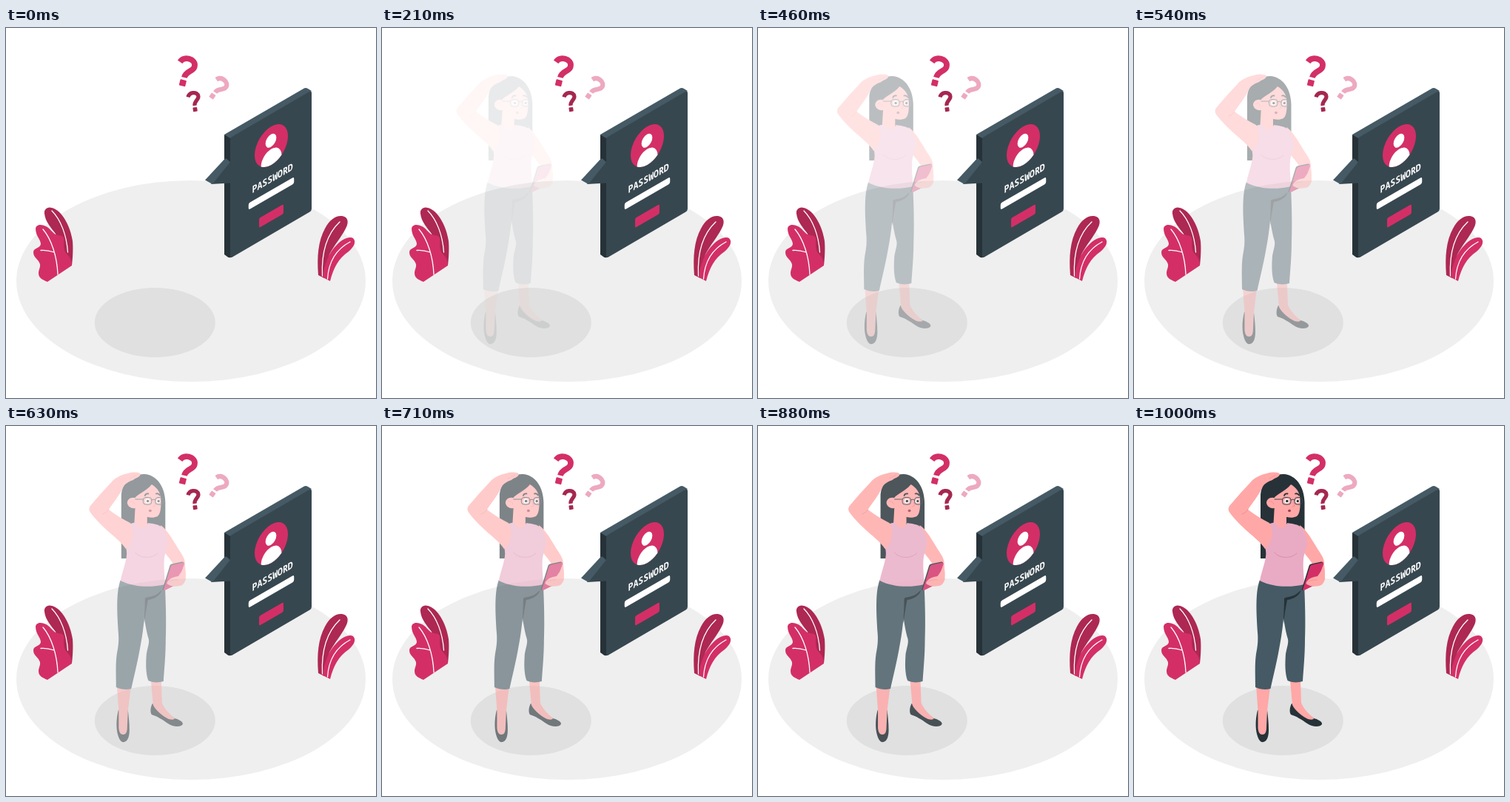
Animation of 500 by 500 pixels, one loop 1040 ms. Source, as an HTML page:

```html
<!DOCTYPE html>
<html lang="en">
<head>
<meta charset="utf-8">
<title>Forgotten password</title>
<style>
  html, body { margin: 0; width: 100%; height: 100%; overflow: hidden; background: #fff; }
  svg { display: block; width: 100vw; height: 100vh; }
  .pink { fill: #d32f66; }
  .deep { fill: #ad2853; }
  .dark { fill: #263238; }
  .skin { fill: #ffa8a7; }
  .slate { fill: #455a64; }
  .front { fill: #37474f; }
  .vein { fill: none; stroke: #fff; stroke-width: 1.3; stroke-linecap: round; }
  .line { fill: none; stroke-linecap: round; stroke-linejoin: round; }
</style>
</head>
<body>
<svg viewBox="0 0 500 500">
  <defs>
    <g id="ask">
      <path d="M-10.500-10.500C-8.500-15.500-4.500-17.500 0-17.500C6-17.500 10.200-14 10.200-9C10.200-2 .3-1 .3 8.500" fill="none" stroke="currentColor" stroke-width="7.800"/>
      <rect x="-4.200" y="12" width="8.600" height="8.400" rx="1" fill="currentColor"/>
    </g>
  </defs>

  <ellipse cx="250" cy="342" rx="236" ry="136" fill="#efefef"/>
  <ellipse cx="201.3" cy="398" rx="81.5" ry="47" fill="#e0e0e0"/>

  <g id="questions">
    <use href="#ask" color="#d32f66" transform="translate(242.700 58.500) rotate(14)"/>
    <use href="#ask" color="#a5274f" transform="translate(254 99.300) rotate(-8) scale(.67)"/>
    <use href="#ask" color="#eda9c0" transform="translate(286.300 81.300) rotate(35) scale(.8)"/>
  </g>

  <g id="board">
    <path class="dark" d="M295 144L304 147V310Q301 311 299 309L295 306Z"/>
    <path class="slate" d="M295 144L402 82Q405 80 408 82L413 85L303 149Z"/>
    <path class="front" d="M303 151Q303 148 306 146.500L409 86.500Q413 84 413 88V244Q413 247 410.500 248.500L306 309.500Q303 311 303 308Z"/>
    <path class="front" d="M277 211L301 180L303 182V209.500Z"/>
    <path class="slate" d="M269 205.500L294.500 178Q297 175.500 299 177.500L303 181L279 211Z"/>
    <g transform="matrix(.866 -.5 0 1 358.500 159)">
      <circle class="pink" r="26"/>
      <circle cx="-.6" cy="-7" r="8.500" fill="#fff"/>
      <path d="M-16 20.500A16 16 0 0 1 16 20.500A26 26 0 0 1-16 20.500Z" fill="#fff"/>
      <text x="-30" y="49.500" font-family="'Noto Sans Mono', 'DejaVu Sans Mono', monospace" font-size="13.300" font-weight="600" fill="#fff">PASSWORD</text>
      <rect x="-35.500" y="60" width="71" height="9" rx="2.500" fill="#fff"/>
      <rect class="pink" x="-19" y="88.500" width="38" height="13" rx="2"/>
    </g>
  </g>

  <g id="plants">
    <path class="deep" d="M52 251C51 245 56 241 62 243C75 246 87 267 90 288C91 300 90 312 89 321L77 312L67 278C62 271 53 262 52 251Z"/>
    <path class="vein" d="M62 247C74 259 82 280 83.500 303"/>
    <path class="pink" d="M40 271C41 265 48 265 54 268C59 270 62 276 67 279C71 281 76 279 78 284C79 289 77 294 79 300C80 306 88 306 89 321L56 343C49 340 44 338 44 331C44 326 48 322 45 317C43 312 37 310 37 303C37 297 46 298 47 292C47 286 40 281 40 271Z"/>
    <path class="vein" d="M50 272C61 285 69 308 70 333M47 300.500C53 300 59 301 65 303"/>
    <path class="deep" d="M422 334C420 308 422 288 431 271C437 259 446 253 454 254C462 255 464 262 459 271C453 283 443 294 437 306L430 338Z"/>
    <path class="vein" d="M451 262C435 277 426 302 427.500 335"/>
    <path class="pink" d="M428 337C430 320 436 303 448 292C455 285 464 281 469 284C474 289 470 296 463 302C449 312 443 323 438 342Z"/>
    <path class="vein" d="M465 289C446 299 436 316 434.500 339"/>
  </g>

  <g id="woman" opacity="0">
    <path class="dark" d="M171 179V96C171 76 184 65 202 65C219 66 230 82 230.500 103V140H190V160L180 179Z"/>

    <g id="legs">
      <path class="dark" d="M167 384C164 396 164 408 166 416C168 424 171 428 175 427C180 426 182 419 182 411C182 401 181 393 180 384Z"/>
      <path class="skin" d="M165 350L167.500 385V408C168 414 170 417 173.500 417C177 417 179 414 179 407L180 385L184 352Z"/>
      <path class="dark" d="M213 375C210 381 210 387 212 390C219 392 227 397 234 402C241 407 252 407 254 403C255 399 247 396 243 395L222 380Z"/>
      <path class="skin" d="M211 344L214 377C217 384 228 393 235 396C239 397 243 397 243 395C236 389 229 382 226 374L225 344Z"/>
      <path class="slate" d="M202 218L230 214C231 235 232 265 231 288C231 310 229 329 228 345C222 347 213 347 207.500 344C204 334 204 322 205 308C207 298 209 293 208 288C204 275 202 260 200 240Z"/>
      <path class="dark" d="M201 250L203 232C213 231 222 228 226 220C225 229 215 234 207 235C205 246 203 256 202 267Z"/>
      <path class="slate" d="M170 208L230 214L226 222C219 226 209 228 203 233C203 260 200 281 196.500 299C193 319 188 339 184.500 355C178 357 170 356 164 353C164 336 163 322 165 308C167 298 168 290 167 279C166 260 163 226 170 208Z"/>
    </g>

    <path class="skin" d="M224 134C231 138 239 151 245 161C250 170 256 176 257 184L258 207C256 214 252 217 247 216L240 203L241 186C236 178 231 174 228 168Z"/>
    <path class="skin" d="M190 106H206V132L208 141H188Z"/>
    <path d="M177 135C183 131 188 131 191 130C193 139 204 140 207 131C214 132 222 133 226 137C231 143 234 151 234 158C233 166 230 171 229 180C228 192 230 204 230 214C214 218 190 219 170 209C173 193 180 179 178 168C175 155 173 143 177 135Z" fill="#e9abc4"/>
    <path class="line" d="M190 171C196 179 212 180 220 172" stroke="#d88eac"/>

    <path class="skin" d="M129 108C139 96 149 85 158 75.500C162 70 171 66 180 64C187 62 195 62 197 65C197 69 190 70 187 73C182 75 176 77 173 84C168 94 160 104 154 113C163 120 173 126 183 131C189 140 187 159 177 166C172 158 163 151 154 143C145 135 136 126 130 118C127 114 127 111 129 108Z"/>
    <path class="line" d="M146 119C149 118 152 116 154 113" stroke="#ee8589" stroke-width=".8"/>
    <path class="line" d="M183 71L192 66" stroke="#ee8589" stroke-width=".6"/>

    <g id="head">
      <path class="skin" d="M189 98C192 92 204 89 212 79C219 83 224 89 224.500 99C225 110 224 119 220 122C214 125 207 124 201 121C193 117 189 106 189 98Z"/>
      <path class="skin" d="M191 98C186 95 179 98 179 104C180 110 187 113 192 110Z"/>
      <path class="line" d="M183 102C186 101 188 103 189 106" stroke="#ee8589" stroke-width=".7"/>
      <circle cx="206.500" cy="101.500" r="3.200" fill="#fff"/>
      <circle cx="221" cy="101.500" r="2.800" fill="#fff"/>
      <circle class="dark" cx="206.800" cy="101.500" r="1.800"/>
      <circle class="dark" cx="221.300" cy="101.500" r="1.700"/>
      <g class="line" stroke="#37474f">
        <rect x="200.500" y="96.500" width="11.500" height="9.500" rx="3.500"/>
        <rect x="217" y="96.500" width="10.500" height="9.500" rx="3.500"/>
        <path d="M190 99H200.500M212 100Q214.500 98 217 100"/>
        <path d="M203 94Q204 91 207.500 91.500M218 91.500Q221 90.500 223 93.500" stroke="#263238" stroke-width="1.800"/>
      </g>
      <path class="line" d="M215 102L217 108L214 109" stroke="#ee8589" stroke-width=".8"/>
      <ellipse cx="210" cy="114.500" rx="2" ry="1.700" fill="#9f3f50"/>
    </g>

    <g id="phone">
      <path class="dark" d="M226.500 221.500L236.500 189Q237 187 239 186.500L253 183.500Q256 183 255.500 186L246 214L229 222Z"/>
      <path class="pink" d="M228 221.500L237.700 190Q238.200 188 240.500 187.500L254 184.500Q256.500 184 256 187L246 214L230 222Z"/>
      <path class="skin" d="M233 211C236 206 241 204 248 203L257 190C259 200 258 209 254 213C250 217 241 218 236 215C233 214 232 213 233 211Z"/>
      <path class="line" d="M236 210C240 208 244 208 247 208" stroke="#ee8589" stroke-width=".6"/>
    </g>
  </g>
</svg>
<script>
  const woman = document.getElementById("woman");
  const LOOP = 1040, STEP = 1000 / 24, FIRST = 5, SHIFT = 30;

  function draw(now) {
    const step = Math.floor((now % LOOP + 4) / STEP);
    // Gentle acceleration drives both the fade and the slide.
    const p = Math.min(1, step / 24) ** 1.5;
    woman.setAttribute("opacity", step < FIRST ? 0 : p);
    woman.setAttribute("transform", `translate(${(p - 1) * SHIFT} 0)`);
  }

  const start = performance.now();
  function tick() {
    draw(performance.now() - start);
    requestAnimationFrame(tick);
  }
  tick();
</script>
</body>
</html>
```
